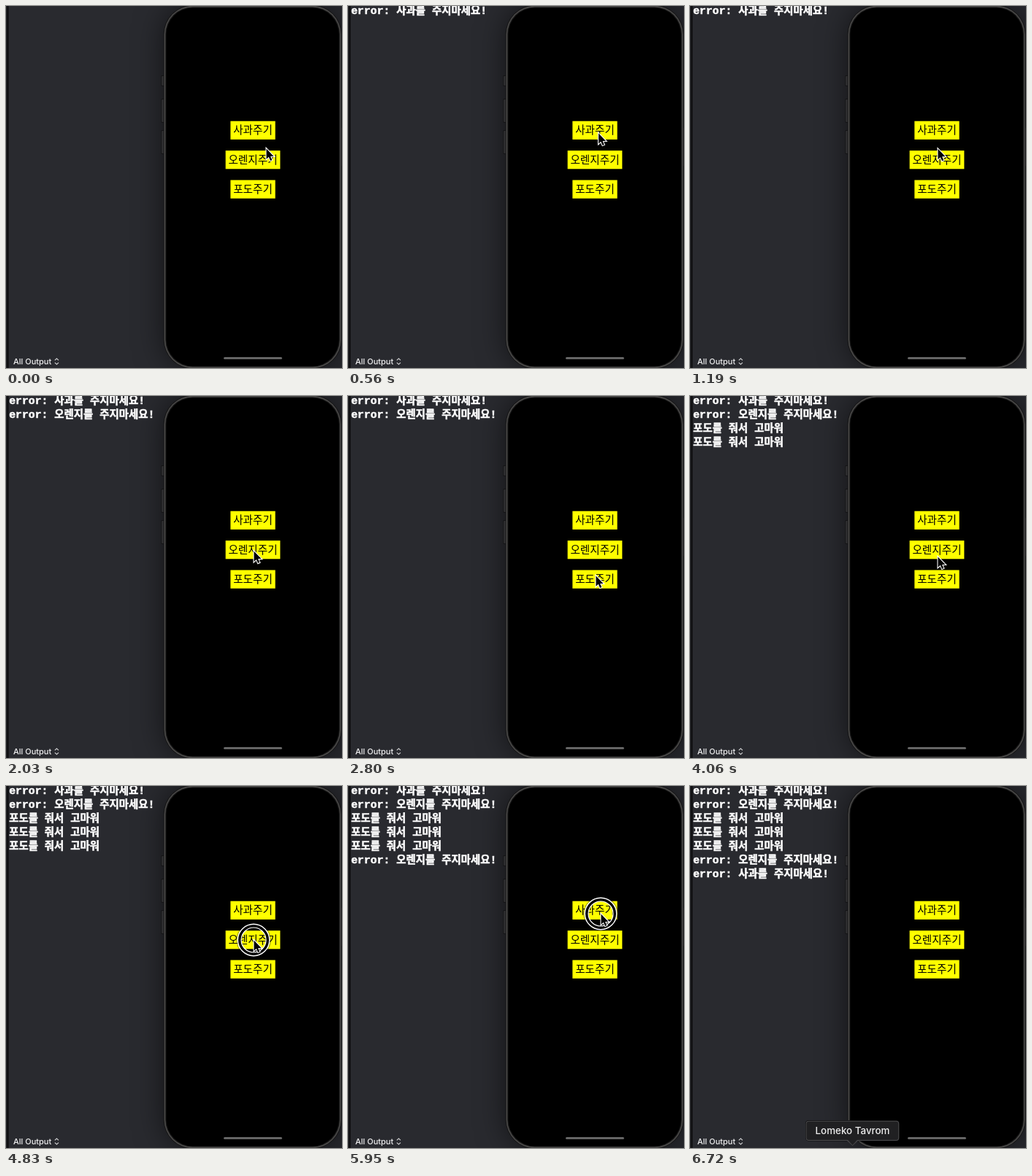
Write an HTML page with a canvas that moves like this. It is 460 by 496 pixels and loops after 6.93 s.

```html
<!DOCTYPE html>
<html lang="ko">
<head>
<meta charset="utf-8">
<title>Console and phone</title>
<style>
  html, body { margin: 0; width: 460px; height: 496px; overflow: hidden; background: #292a2f; }
  canvas { display: block; }
</style>
</head>
<body>
<canvas id="stage" width="460" height="496"></canvas>
<script>
const ctx = document.getElementById('stage').getContext('2d');
const LOOP = 6930, STEP = 70, PRESS = 140;
const KR = '"Noto Sans CJK KR", "Noto Sans CJK", sans-serif';

const apple = 'error: 사과를 주지마세요!';
const orange = 'error: 오렌지를 주지마세요!';
const grape = '포도를 줘서 고마워';

// Where the pointer rests, when it arrives and leaves, when it lets go of a click
const stops = [
  { x: 356, y: 195, from: 0, to: 0 },
  { x: 346, y: 174, from: 280, to: 490, clicks: [490], says: apple },
  { x: 339, y: 174, from: 630, to: 770 },
  { x: 339, y: 206, from: 1400, to: 1890, clicks: [1680], says: orange },
  { x: 339, y: 246, from: 2800, to: 3780, clicks: [3010, 3780], says: grape },
  { x: 339, y: 220, from: 4060, to: 4060 },
  { x: 339, y: 248, from: 4270, to: 4480, clicks: [4480], says: grape },
  { x: 339, y: 211, from: 4690, to: 4900, clicks: [4900], says: orange },
  { x: 344, y: 185, from: 5110, to: 5530, clicks: [5250] },
  { x: 346, y: 175, from: 5880, to: 6020, clicks: [6020], says: apple },
  { x: 283, y: 414, from: 6230, to: 6230 },
  { x: 222, y: 502, from: 6440, to: LOOP }
];
const clicks = stops.flatMap(s => (s.clicks || []).map(at => ({ at, says: s.says })));

function box(x, y, w, h, r, fill) {
  ctx.beginPath();
  ctx.roundRect(x, y, w, h, r);
  ctx.fillStyle = fill;
  ctx.fill();
}

function text(str, x, y, font, color, align = 'left') {
  ctx.font = font;
  ctx.fillStyle = color;
  ctx.textAlign = align;
  ctx.fillText(str, x, y);
}

function circle(x, y, r, width, color) {
  ctx.beginPath();
  ctx.arc(x, y, r, 0, Math.PI * 2);
  ctx.lineWidth = width;
  ctx.strokeStyle = color;
  ctx.stroke();
}

function polyline(points, close) {
  ctx.beginPath();
  points.forEach(([x, y]) => ctx.lineTo(x, y));
  if (close) ctx.closePath();
}

function drawPanel() {
  ctx.fillStyle = '#292a2f';
  ctx.fillRect(0, 0, 460, 496);
  ctx.fillStyle = '#1d1e21';
  ctx.fillRect(0, 0, 2, 496);
  ctx.fillStyle = '#050506';
  ctx.fillRect(2, 0, 1.3, 496);
  text('All Output', 10, 491, '500 11px Inter, sans-serif', '#f0f0f1');
  ctx.strokeStyle = '#d0d0d2';
  ctx.lineWidth = 1.1;
  for (const d of [-1, 1]) {
    polyline([[66.8, 487 + 1.6 * d], [69.4, 487 + 4 * d], [72, 487 + 1.6 * d]]);
    ctx.stroke();
  }
}

function drawPhone() {
  const shell = (inset, fill) =>
    box(215.6 + inset, -1.2 + inset, 244 - 2 * inset, 498.4 - 2 * inset, 40 - inset, fill);
  ctx.save();
  ctx.shadowColor = 'rgba(0,0,0,.6)';
  ctx.shadowBlur = 42;
  shell(2, '#000');
  ctx.restore();
  for (const [y, h] of [[95, 15], [127, 33], [170, 33]]) {
    box(212.5, y, 5, h, 1, '#141415');
    box(213.2, y + 1, 3.4, h - 2, 1, '#303032');
  }
  box(458, 167, 2, 52, 0, '#303032');
  shell(0, '#161617');
  shell(1, '#4b4a49');
  shell(2.6, '#1a1a1a');
  shell(3.8, '#000');
  box(298, 481, 80, 3, 1.5, '#656565');
}

function drawButton(label, row) {
  const w = 7.5 + 13.45 * label.length, y = 157.7 + 40.4 * row;
  ctx.fillStyle = '#ffff00';
  ctx.fillRect(338 - w / 2, y, w, 25.2);
  text(label, 338, y + 17.5, '350 14.6px ' + KR, '#000', 'center');
}

// Hangul and Latin runs have their own fonts and sizes
function drawLine(str, row) {
  let x = 4.2;
  const y = 10.6 + 19 * row;
  ctx.strokeStyle = '#fff';
  ctx.lineWidth = 0.5;
  for (const run of str.match(/[가-힣]+|[^가-힣]+/g)) {
    const font = /[가-힣]/.test(run)
      ? 'bold 14.4px ' + KR
      : 'bold 14.8px "Liberation Mono", monospace';
    text(run, x, y, font, '#fff');
    ctx.strokeText(run, x, y);
    x += ctx.measureText(run).width;
  }
}

function pointerAt(t) {
  const i = stops.findIndex(s => t <= s.to);
  const b = stops[i], a = stops[i - 1] || b;
  const u = t >= b.from ? 1 : (t - a.to) / (b.from - a.to);
  return [a.x + (b.x - a.x) * u, a.y + (b.y - a.y) * u];
}

function drawRing(x, y) {
  circle(x, y, 23, 1.6, 'rgba(0,0,0,.3)');
  circle(x, y, 19.3, 4.8, '#000');
  circle(x, y, 21.7, 1.4, '#fff');
  circle(x, y, 17, 1.2, '#fff');
}

function drawPointer(x, y) {
  ctx.save();
  ctx.translate(x + 0.5, y + 0.5);
  ctx.scale(0.93, 0.93);
  polyline([[0, 0], [0, 15.4], [3.5, 12.2], [5.9, 17.7], [8.4, 16.6], [6, 11.2], [10.8, 11.2]], true);
  ctx.lineWidth = 2.3;
  ctx.strokeStyle = '#fff';
  ctx.stroke();
  ctx.fillStyle = '#000';
  ctx.fill();
  ctx.restore();
}

function drawTooltip() {
  box(158, 458, 129, 28.5, 4.5, '#0b0b0c');
  for (const [inset, fill] of [[0, '#4a4a4c'], [1, '#202022']]) {
    box(158.6 + inset, 458.7 + inset, 127.6 - 2 * inset, 27.3 - 2 * inset, 4 - inset, fill);
    polyline([[215 + inset, 486 - inset], [222.5, 493 - inset], [230 - inset, 486 - inset]], true);
    ctx.fill();
  }
  text('Lomeko Tavrom', 222.5, 477, '500 13.4px Inter, sans-serif', '#ececec', 'center');
}

function draw(t) {
  drawPanel();
  drawPhone();
  ['사과주기', '오렌지주기', '포도주기'].forEach(drawButton);
  clicks.filter(c => c.says && t >= c.at).forEach((c, row) => drawLine(c.says, row));
  const tip = pointerAt(t);
  if (clicks.some(c => t >= c.at - PRESS && t < c.at)) drawRing(...tip);
  drawPointer(...tip);
  if (t >= 6720) drawTooltip();
}

const start = performance.now();
function tick() {
  const t = (performance.now() - start) % LOOP;
  draw(Math.floor(t / STEP) * STEP);
  requestAnimationFrame(tick);
}
tick();
</script>
</body>
</html>
```
